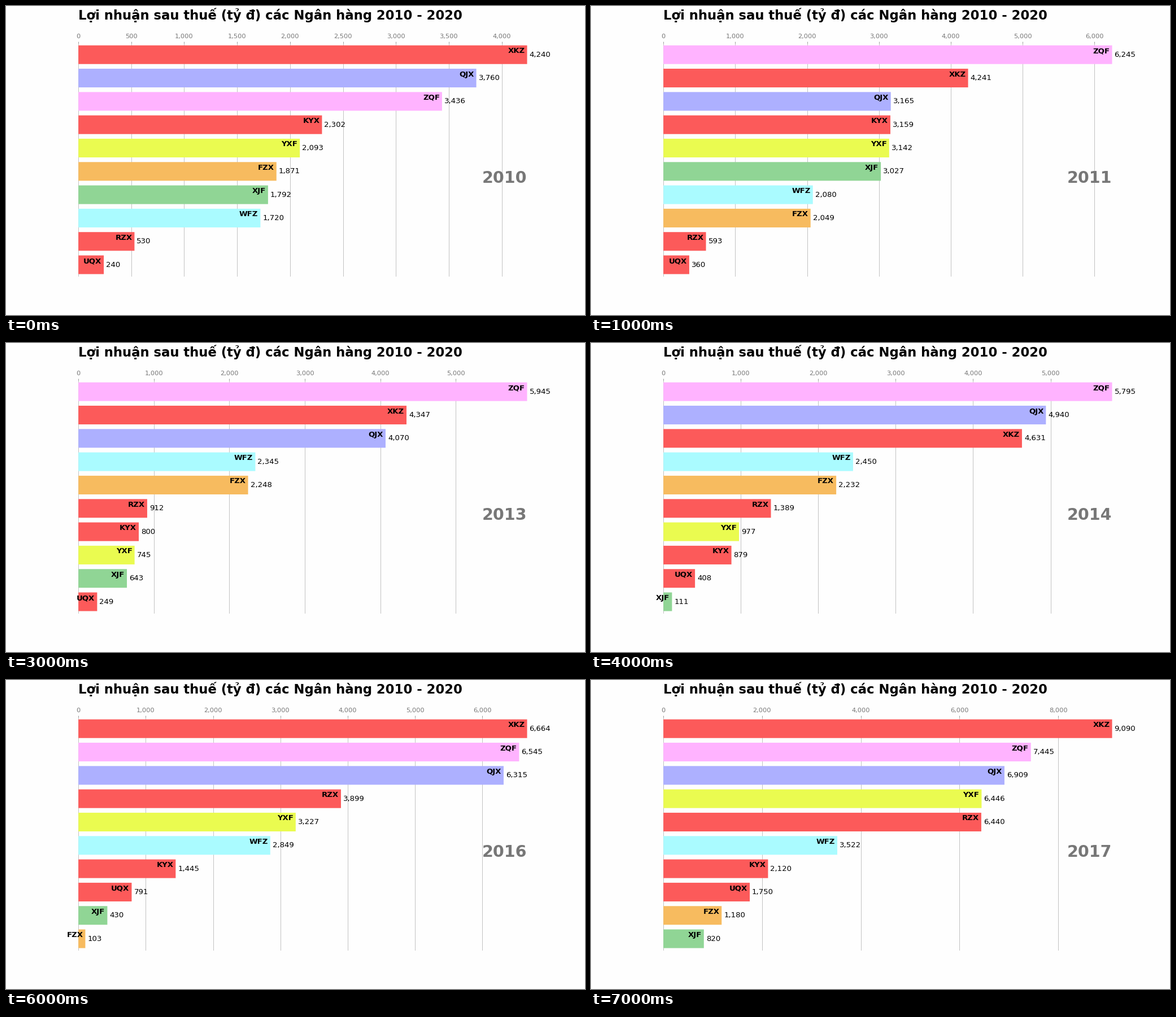
Recreate the animation shown at these times as a matplotlib script. Size 1025 by 547 pixels, loop 8 s.

```python
import math

import matplotlib.pyplot as plt
from matplotlib.animation import FuncAnimation
from matplotlib.ticker import StrMethodFormatter

WIDTH, HEIGHT, DPI = 1025, 547, 100
PT = 72 / DPI * WIDTH / 1080  # type sizes are set for a 1080 pixel wide layout
FIRST_YEAR, YEARS = 2010, 8
PAPER, GREY, RED = "#fefefe", "#777777", "#fc5a5a"


def late(t, gain, power):
    """Growth that reaches its full gain in the last year."""
    return gain * (t / (YEARS - 1)) ** power


def hump(t, peak, centre, width):
    return peak * math.exp(-((t - centre) / width) ** 2)


def ramp(t, start):
    return max(0, t - start)


# Bank code: (bar colour, profit as a function of years since FIRST_YEAR)
BANKS = {
    "XKZ": (RED, lambda t: 4240 + late(t, 4850, 4.5)),
    "QJX": ("#adb0ff",
            lambda t: 3760 - 595 * min(t, 2) + 1500 * ramp(t, 2) ** 0.66),
    "ZQF": ("#ffb3ff",
            lambda t: min(3436 + 2809 * t, 6395 - 150 * t + 1050 * ramp(t, 5))),
    "KYX": (RED, lambda t: 770 + hump(t, 3900, 0.58, 0.6) + late(t, 1350, 4.5)),
    "YXF": ("#eafb50",
            lambda t: 680 + hump(t, 3840, 0.6, 0.6) + late(t, 5766, 5.3)),
    "FZX": ("#f7bb5f",
            lambda t: 80 + hump(t, 2300, 0.55, 1.1) + hump(t, 2600, 3.5, 1.15)
            + 1100 * ramp(t, 6)),
    "XJF": ("#90d595",
            lambda t: 40 + hump(t, 3000, 1.1, 1.5) + 390 * ramp(t, 5)),
    "WFZ": ("#aafbff",
            lambda t: 1720 + 360 * math.sqrt(t) + late(t, 850, 8)),
    "RZX": (RED, lambda t: 530 + 60 * t + late(t, 5490, 3.9)),
    "UQX": (RED,
            lambda t: 320 - 80 * math.cos(math.tau * t / 3) + late(t, 1390, 6)),
}

plt.rcParams["font.family"] = "DejaVu Sans"
fig = plt.figure(figsize=(WIDTH / DPI, HEIGHT / DPI), dpi=DPI, facecolor=PAPER)
ax = fig.add_axes([0.125, 0.125, 0.775, 0.755])


def style_axes():
    ax.set_frame_on(False)
    ax.set_axisbelow(True)
    ax.margins(0, 0.01)
    ax.set_yticks([])
    ax.xaxis.set_ticks_position("top")
    ax.xaxis.set_major_formatter(StrMethodFormatter("{x:,.0f}"))
    ax.tick_params(axis="x", colors=GREY, labelsize=12 * PT,
                   length=3.5 * PT, pad=3.5 * PT, width=0.8 * PT)
    ax.grid(axis="x", color="#b0b0b0", linewidth=0.8 * PT)


def draw(step):
    ax.clear()
    style_axes()
    ranked = sorted((profit(step), code, color)
                    for code, (color, profit) in BANKS.items())
    gap = ranked[-1][0] / 200
    for row, (profit, code, color) in enumerate(ranked):
        ax.barh(row, profit, color=color, snap=False)
        ax.text(profit - gap, row, code, size=14 * PT, weight="bold",
                ha="right", va="bottom")
        ax.text(profit + gap, row, f"{profit:,.0f}", size=14 * PT,
                ha="left", va="center")

    ax.text(1, 0.4, str(FIRST_YEAR + step), transform=ax.transAxes,
            size=30 * PT, weight="bold", color=GREY, ha="right")
    ax.text(0, 1.12, "Lợi nhuận sau thuế (tỷ đ) các Ngân hàng 2010 - 2020",
            transform=ax.transAxes, size=24 * PT, weight="bold",
            ha="left", va="center")


animation = FuncAnimation(fig, draw, frames=YEARS, init_func=lambda: None,
                          interval=1000, repeat=True, repeat_delay=0)
plt.show()
```
